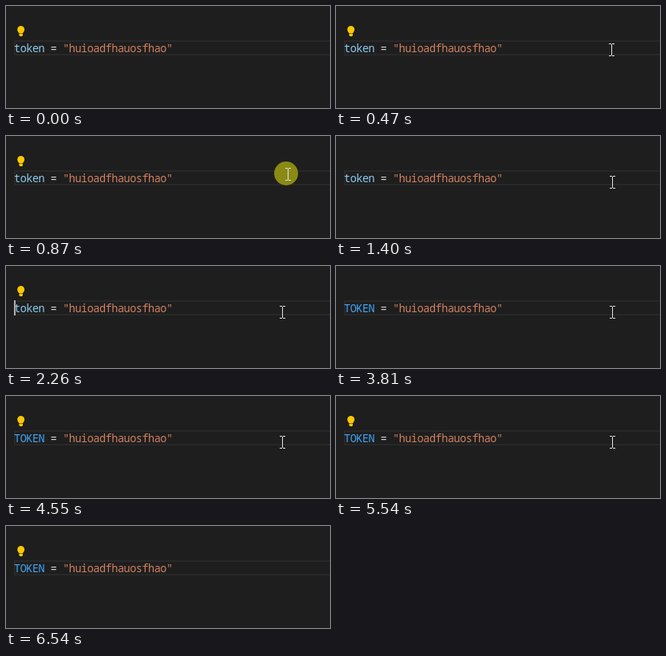
An HTML page that plays this animation: 406 px wide and 128 px high, repeating every 6.89 s.

```html
<!DOCTYPE html>
<html lang="en">
<head>
<meta charset="utf-8">
<title>Rename to upper case</title>
<style>
  html, body { margin: 0; width: 100%; height: 100%; overflow: hidden; background: #1e1e1e; }
  svg { display: block; width: 406px; height: 128px; }
  text { font: 13.5px "Noto Sans Mono", "DejaVu Sans Mono", monospace; letter-spacing: -0.46px; white-space: pre; }
</style>
</head>
<body>
<svg viewBox="0 0 406 128">
  <rect width="406" height="128" fill="#1e1e1e"/>
  <rect x="11" y="44" width="410" height="17" fill="none" stroke="#282828" stroke-width="2"/>
  <rect id="mark" x="11" y="44" width="37" height="17" fill="#083d5a"/>
  <text x="10" y="58"><tspan id="word">token</tspan><tspan fill="#d4d4d4"> = </tspan><tspan fill="#d08060">"huioadfhauosfhao"</tspan></text>
  <g id="bulb" fill="#ffc800">
    <path d="M18.7 25a4.5 4.5 0 0 1 4.5 4.5c0 2-1.300 3-2 4.500h-5c-.7-1.500-2-2.500-2-4.500a4.500 4.500 0 0 1 4.500-4.500z"/>
    <path d="M16.500 34.500h4.500v2.500l-1 1h-2.500l-1-1z"/>
  </g>
  <rect id="caret" y="43" width="2" height="19" fill="#aeafad"/>
  <circle id="click" cx="351" cy="47" r="15" fill="#8a8a14"/>
  <path id="pointer" d="M-3 -7.500h3M1 -7.500h3M.5 -7v14M-3 7.500h3M1 7.500h3" fill="none" stroke="#e4e4e4" shape-rendering="crispEdges"/>
</svg>
<script>
  const LOOP = 6890, STEP = 1000 / 15;
  const ENTER = 130, CLICK = 940, HOME = 2060, EDIT = 3550, LEAVE = 6400;
  const REST = [346, 58], AIM = [353, 48], ARRIVE = [345, 55];

  const $ = id => document.getElementById(id);
  const show = (id, on) => $(id).setAttribute("visibility", on ? "visible" : "hidden");
  const easeOut = u => 1 - (1 - u) ** 2;
  const progress = (t, from, to) => Math.min(1, Math.max(0, (t - from) / (to - from)));

  // Point on a quadratic curve
  const curve = (a, b, c, u) =>
    a.map((v, i) => Math.round((1 - u) ** 2 * v + 2 * u * (1 - u) * b[i] + u * u * c[i]));
  const line = (a, b, u) => a.map((v, i) => Math.round(v + (b[i] - v) * u));

  function pointerAt(t) {
    if (t < 600) return curve([337, 95], [337, 58], ARRIVE, easeOut(progress(t, ENTER, 470)));
    if (t < 1000) return line(ARRIVE, AIM, easeOut(progress(t, 600, 800)));
    if (t < 6000) return line(AIM, REST, progress(t, 1000, 1200));
    return curve(REST, [360, 10], [383, 115], progress(t, 6000, 6340));
  }

  function caretOn(t) {
    if (t < CLICK) return false;
    if (t < HOME) return (t - CLICK) % 990 < 460;
    if (t < EDIT) return (t - HOME) % 950 < 470;
    return (t - EDIT) % 993 >= 468;
  }

  function draw(t) {
    const [x, y] = pointerAt(Math.floor((t + 5) / STEP) * STEP);
    $("pointer").setAttribute("transform", `translate(${x} ${y})`);
    show("pointer", t >= ENTER && t < LEAVE);
    show("click", t >= 870 && t < 1000);

    $("word").textContent = t < EDIT ? "token" : "TOKEN";
    $("word").setAttribute("fill", t < EDIT + 260 ? "#8accf0" : "#42a5f5");
    show("mark", t >= HOME + 270 && t < EDIT);
    show("bulb", t < CLICK || (t >= HOME + 200 && t < EDIT) || t >= EDIT + 530);

    $("caret").setAttribute("x", t < HOME ? 208 : 10);
    show("caret", caretOn(t));
  }

  const start = performance.now();
  function tick() {
    draw((performance.now() - start) % LOOP);
    requestAnimationFrame(tick);
  }
  tick();
</script>
</body>
</html>
```
